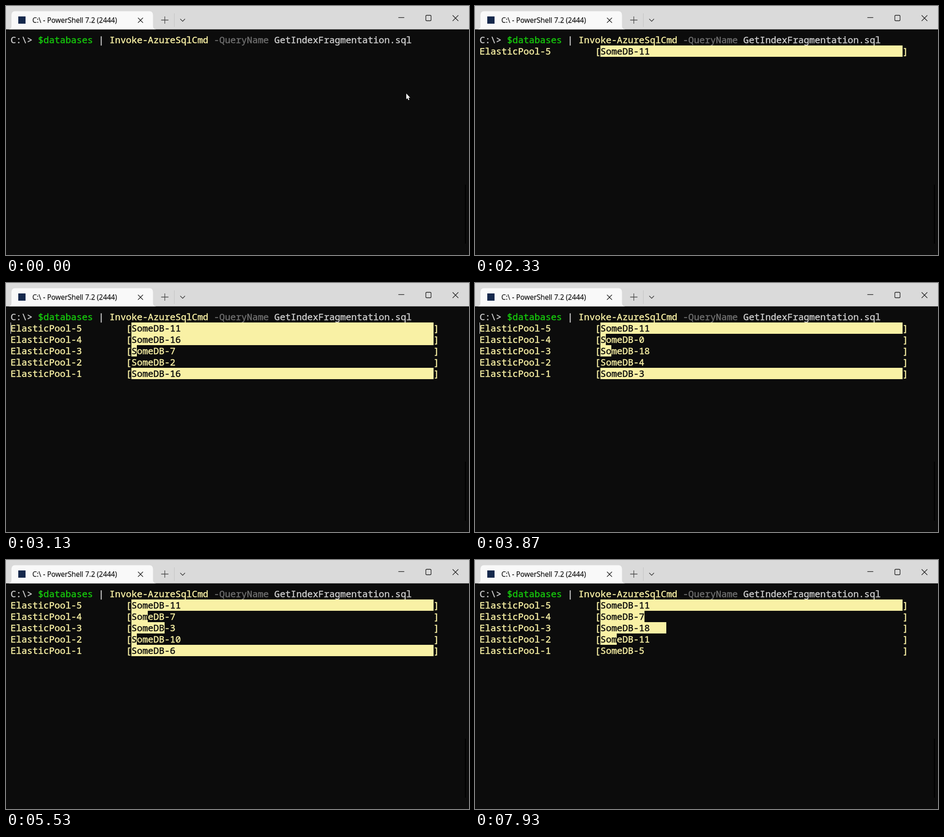
Recreate the animation shown at these times as an HTML page with a canvas. Size 1019 by 549 pixels, loop 8000 ms.

```html
<!DOCTYPE html>
<html lang="en">
<head>
<meta charset="utf-8">
<title>Terminal progress</title>
<style>
  html, body { margin: 0; width: 100%; height: 100%; overflow: hidden; background: #0c0c0c; }
  canvas { display: block; }
</style>
</head>
<body>
<canvas id="stage" width="1019" height="549"></canvas>
<script>
const ctx = document.getElementById('stage').getContext('2d');
const LOOP = 8000, LEFT = 10, TOP = 62, CELL = 12.095, LINE = 25;
const BAR_COL = 22, BAR_CELLS = 55;
const BLACK = '#0c0c0c', WHITE = '#cccccc', YELLOW = '#f9f1a5', GREEN = '#16c60c', GRAY = '#6e6e6e';
const POINTER_HIDES = 1530, OUTPUT_STARTS = 1600, FIRST_POOL = 2330, POOL_DELAY = 140;
const QUERY_START = 2270, QUERY_TIME = 1200;

const clamp = u => Math.min(1, Math.max(0, u));
const smooth = u => u * u * (3 - 2 * u);

// Pools show a full bar until their first database reports, then fill up.
const pools = [
  { databases: [11], fullUntil: LOOP },
  { databases: [16, 0, 7], fullUntil: 3470, cells: t => 1 + 7 * smooth(clamp((t - 3870) / 3730)) },
  { databases: [7, 18, 3, 12, 18], fullUntil: 0, cells: t => (t - 2690) / 435 },
  { databases: [2, 4, 10, 13, 11], fullUntil: 0, cells: t => (t - 3170) / 1480 },
  { databases: [16, 3, 6, 10, 5], fullUntil: 5670, cells: () => 0 }
];

const colX = col => LEFT + col * CELL;
const rowY = row => TOP + row * LINE;

function rect(x, y, w, h, color) {
  ctx.fillStyle = color;
  ctx.fillRect(x, y, w, h);
}

// A thin outline in the same color gives the letters their medium weight.
function drawText(text, x, y, font, color, outline) {
  ctx.font = font;
  ctx.fillStyle = ctx.strokeStyle = color;
  ctx.lineWidth = outline;
  ctx.lineJoin = 'round';
  ctx.fillText(text, x, y);
  ctx.strokeText(text, x, y);
}

function write(text, col, row, color) {
  drawText(text, colX(col), rowY(row) + 20,
    '500 20.16px "Noto Sans Mono", "DejaVu Sans Mono", monospace', color, 0.5);
}

function stroke(path, color = '#1a1a1a', width = 1.3) {
  ctx.strokeStyle = color;
  ctx.lineWidth = width;
  ctx.stroke(new Path2D(path));
}

function drawTitleBar() {
  rect(0, 0, 1019, 51.5, '#dadada');
  ctx.fillStyle = '#f9f9f9';
  ctx.fill(new Path2D('M5 51.5Q12 51.5 12 44V20Q12 11.5 20 11.5H315.5Q323.5 11.5 323.5 20V44Q323.5 51.5 331 51.5Z'));
  rect(27, 23, 16, 16, '#15284c');
  drawText('C:\\ - PowerShell 7.2 (2444)', 58, 37,
    '15.45px "Open Sans", "Noto Sans", sans-serif', '#111', 0.25);
  stroke('M290.5 26L301.5 37M301.5 26L290.5 37');
  stroke('M341.5 31H357.5M349.5 23V39', '#444');
  stroke('M370.5 16V46', '#c4c4c4', 1);
  stroke('M383.5 28.5L388.8 33.8L394 28.5', '#333');
  stroke('M863.5 25.5H876.5');
  stroke('M926 20.5H933.5Q935.5 20.5 935.5 22.5V30.5Q935.5 32.5 933.5 32.5H926Q924 32.5 924 30.5V22.5Q924 20.5 926 20.5Z');
  stroke('M983 20.5L995.5 33M995.5 20.5L983 33');
}

function drawCommand() {
  write('C:\\>', 0, 0, WHITE);
  write('$databases', 5, 0, GREEN);
  write('|', 16, 0, WHITE);
  write('Invoke-AzureSqlCmd', 18, 0, YELLOW);
  write('-QueryName', 37, 0, GRAY);
  write('GetIndexFragmentation.sql', 48, 0, WHITE);
}

function drawPool({ databases, fullUntil, cells }, index, t) {
  if (t < FIRST_POOL + index * POOL_DELAY) return;
  const row = index + 1;
  const query = Math.max(0, Math.floor((t - QUERY_START) / QUERY_TIME));
  const label = 'SomeDB-' + databases[Math.min(query, databases.length - 1)];
  const filled = t < fullUntil ? BAR_CELLS : Math.max(0, Math.floor(cells(t)));

  write('ElasticPool-' + (pools.length - index), 0, row, YELLOW);
  write('[', BAR_COL - 1, row, YELLOW);
  write(']', BAR_COL + BAR_CELLS, row, YELLOW);
  write(label, BAR_COL, row, YELLOW);

  const x = Math.round(colX(BAR_COL));
  const width = Math.round(colX(BAR_COL + filled)) - x;
  ctx.save();
  ctx.beginPath();
  ctx.rect(x, rowY(row), width, LINE);
  ctx.clip();
  rect(x, rowY(row), width, LINE, YELLOW);
  write(label, BAR_COL, row, BLACK);
  ctx.restore();
}

function drawCaret(t) {
  const entered = t >= OUTPUT_STARTS;
  const blink = Math.floor(entered ? (t - 1600) / 553 - 1.085 : (t + 130) / 530);
  if (blink & 1) rect(entered ? LEFT : 893, rowY(entered ? 1 : 0), 1, LINE, '#fff');
}

function drawPointer(t) {
  if (t >= POINTER_HIDES) return;
  const progress = Math.ceil(clamp((t - 69) / 260) * 4) / 4;
  ctx.save();
  ctx.translate(881 + 49 * progress, 193 - 37 * progress);
  ctx.fillStyle = '#fff';
  ctx.fill(new Path2D('M0 0V12.5L2.8 10L4.6 14.6L6.6 13.8L4.8 9.3H8.6Z'));
  ctx.restore();
}

function draw(now) {
  const t = now % LOOP;
  rect(0, 0, 1019, 549, BLACK);
  drawTitleBar();
  rect(1010, 394, 2, 130, '#000');
  drawCommand();
  pools.forEach((pool, index) => drawPool(pool, index, t));
  drawCaret(t);
  drawPointer(t);
}

const start = performance.now();
function tick() {
  draw(performance.now() - start);
  requestAnimationFrame(tick);
}
tick();
</script>
</body>
</html>
```
